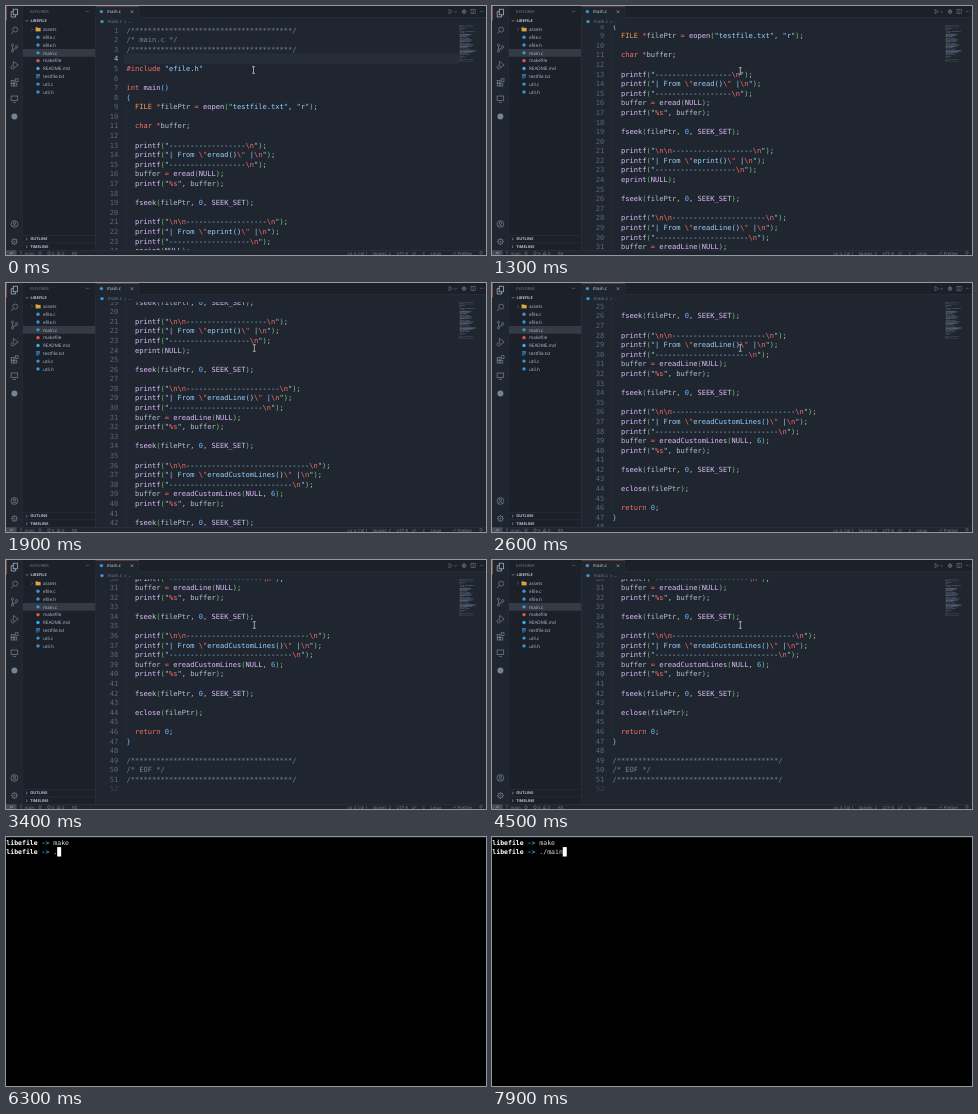
Animation of 480 by 249 pixels, one loop 8 s. Source, as an HTML page with a canvas:

```html
<!DOCTYPE html>
<html lang="en">
<head>
<meta charset="utf-8">
<title>Editor and terminal</title>
<style>
  html, body { margin: 0; width: 100%; height: 100%; overflow: hidden; background: #20262f; }
  canvas { display: block; width: 480px; height: 249px; }
</style>
</head>
<body>
<canvas id="stage"></canvas>
<script>
const W = 480, H = 249, LOOP = 8000;
const canvas = document.getElementById('stage');
const dpr = window.devicePixelRatio || 1;
canvas.width = W * dpr;
canvas.height = H * dpr;
const ctx = canvas.getContext('2d');
ctx.scale(dpr, dpr);
ctx.textRendering = 'geometricPrecision';

const MONO = '"DejaVu Sans Mono", monospace';
const UI = '"Open Sans", "Noto Sans", sans-serif';
const C = {
  bg: '#20262f', side: '#1b2029', line: '#343b45', text: '#b4c1d0', dim: '#768390',
  num: '#5c6672', red: '#f47067', str: '#96d0ff', fn: '#dcbdfb', con: '#6cb6ff',
  type: '#f69d50', brace: ['#6cb6ff', '#6bc46d', '#daaa3f'], accent: '#d0695a'
};

// ---- Document ----
const CELL = 4.25, LINE = 9.59, TICK = 17.76, CODE_X = 120.6, CODE_Y = 24;

const stars = '/' + '*'.repeat(38) + '/';
const seek = ['', '  fseek(filePtr, 0, SEEK_SET);', ''];
const banner = (name, lead) => {
  const title = `| From \\"${name}()\\" |`;
  const dashes = '-'.repeat(title.length - 2);
  return [`${lead}${dashes}`, title, dashes].map(s => `  printf("${s}\\n");`);
};
const show = '  printf("%s", buffer);';
const doc = [
  stars, '/* main.c */', stars, '', '#include "efile.h"', '', 'int main()', '{',
  '  FILE *filePtr = eopen("testfile.txt", "r");', '', '  char *buffer;', '',
  ...banner('eread', ''), '  buffer = eread(NULL);', show, ...seek,
  ...banner('eprint', '\\n\\n'), '  eprint(NULL);', ...seek,
  ...banner('ereadLine', '\\n\\n'), '  buffer = ereadLine(NULL);', show, ...seek,
  ...banner('ereadCustomLines', '\\n\\n'), '  buffer = ereadCustomLines(NULL, 6);', show, ...seek,
  '  eclose(filePtr);', '', '  return 0;', '}', '', stars, '/* EOF */', stars, ''
];

let depth = 0;
function tokenize(src) {
  const out = [];
  const add = (s, col, color) => out.push({ s, col, color });
  const rule = /\/\*.*\/|"(?:\\.|[^"\\])*"|#?\w+|[^\s\w]/g;
  for (const m of src.matchAll(rule)) {
    const s = m[0], col = m.index, next = src[col + s.length];
    if (s.startsWith('/')) add(s, col, C.dim);
    else if (s[0] === '"') {
      for (const p of s.matchAll(/\\.|%s|(?:(?!\\|%s).)+/g))
        add(p[0], col + p.index, /^(\\|%s)/.test(p[0]) ? C.red : C.str);
    }
    else if (/^(#include|int|char|return|\*|=)$/.test(s)) add(s, col, C.red);
    else if (s === 'FILE') add(s, col, C.type);
    else if (/^\d+$/.test(s)) add(s, col, C.con);
    else if (/[({]/.test(s)) add(s, col, C.brace[depth++ % 3]);
    else if (/[)}]/.test(s)) add(s, col, C.brace[--depth % 3]);
    else add(s, col, next === '(' || /^(NULL|SEEK_SET)$/.test(s) ? C.fn : C.text);
  }
  return out;
}
const lines = doc.map(tokenize);

// ---- Drawing helpers ----
function rect(x, y, w, h, color) {
  ctx.fillStyle = color;
  ctx.fillRect(x, y, w, h);
}
function dot(x, y, r, color) {
  ctx.fillStyle = color;
  ctx.beginPath();
  ctx.arc(x, y, r, 0, 7);
  ctx.fill();
}
function ring(x, y, r, color, w = 0.7) {
  ctx.strokeStyle = color;
  ctx.lineWidth = w;
  ctx.beginPath();
  ctx.arc(x, y, r, 0, 7);
  ctx.stroke();
}
function path(points, color, w = 0.7) {
  ctx.strokeStyle = color;
  ctx.lineWidth = w;
  ctx.beginPath();
  for (let i = 0; i < points.length; i += 2) ctx.lineTo(points[i], points[i + 1]);
  ctx.stroke();
}
function box(x, y, w, h, color, lw = 0.7) {
  ctx.strokeStyle = color;
  ctx.lineWidth = lw;
  ctx.strokeRect(x, y, w, h);
}
function label(s, x, y, color, size = 4.62, weight = 400) {
  ctx.font = `${weight} ${size}px ${UI}`;
  ctx.fillStyle = color;
  ctx.fillText(s, x, y + size * 0.36);
}
function cells(s, x, y, step, color) {
  ctx.fillStyle = color;
  for (let i = 0; i < s.length; i++) ctx.fillText(s[i], x + i * step, y);
}
const down = (x, y, c) => path([x - 1.3, y - 0.7, x, y + 0.7, x + 1.3, y - 0.7], c, 0.5);
const right = (x, y, c) => path([x - 0.7, y - 1.3, x + 0.7, y, x - 0.7, y + 1.3], c, 0.5);
function gear(x, y, r, color) {
  ring(x, y, r * 0.7, color);
  ring(x, y, r * 0.22, color, 0.5);
  for (let a = 0; a < 8; a++) {
    const cx = Math.cos(a * Math.PI / 4), cy = Math.sin(a * Math.PI / 4);
    path([x + cx * r * 0.7, y + cy * r * 0.7, x + cx * r, y + cy * r], color, 0.8);
  }
}

// ---- Editor parts ----
function activityBar() {
  rect(0, 0, 17, 244, C.bg);
  rect(16.8, 0, 0.4, 244, C.line);
  rect(0, 0, 0.6, 14.5, C.accent);
  const d = C.dim, x = 8.4;
  box(x - 1.2, 3.2, 4.3, 5.6, C.text);
  path([x - 1.2, 5.6, x - 3.2, 5.6, x - 3.2, 11, x + 1.2, 11, x + 1.2, 8.8], C.text);
  ring(x + 0.8, 23.6, 2.5, d);
  path([x - 1, 25.4, x - 3.4, 28], d);
  ring(x - 1.9, 39.2, 1.1, d);
  ring(x - 1.9, 45, 1.1, d);
  ring(x + 2.2, 40.7, 1.1, d);
  path([x - 1.9, 40.3, x - 1.9, 43.9], d);
  path([x + 2.2, 41.8, x + 1.4, 43, x - 1.9, 43.2], d);
  path([x - 1, 59, x - 1, 55.4, x + 3.8, 59, x, 61.8], d);
  ring(x - 1.7, 61.3, 1.6, d);
  box(x - 3.2, 74.4, 2.8, 2.8, d);
  box(x - 3.2, 77.2, 2.8, 2.8, d);
  box(x - 0.4, 77.2, 2.8, 2.8, d);
  box(x + 0.8, 72.8, 2.8, 2.8, d);
  box(x - 3.3, 90, 6.6, 4.6, d);
  path([x - 1.6, 96.4, x + 1.6, 96.4], d);
  dot(x, 110.5, 3, d);
  ring(x, 218, 3.4, d);
  ring(x, 217, 1.2, d);
  path([x - 2.2, 220.5, x - 1, 219.2, x + 1, 219.2, x + 2.2, 220.5], d);
  gear(x, 235.6, 3.5, d);
}

const blue = '#3c95d0';
const files = [
  ['assets', '#d9a441'], ['efile.c', blue], ['efile.h', blue], ['main.c', blue],
  ['makefile', '#e0584f'], ['README.md', '#42a5f5'], ['testfile.txt', '#42a5f5'],
  ['util.c', blue], ['util.h', blue]
];
function sidebar() {
  rect(17, 0, 72.5, 244, C.side);
  rect(89.2, 0, 0.4, 244, C.line);
  label('EXPLORER', 24, 5.6, C.dim, 3.9);
  label('···', 79.5, 5.4, C.dim, 5, 700);
  down(21, 14.7, C.text);
  label('LIBEFILE', 24.6, 14.7, C.text, 3.9, 700);
  files.forEach(([name, color], i) => {
    const y = 23.4 + i * 7.815;
    if (name === 'main.c') rect(17, y - 3.9, 72.2, 7.8, '#343b45');
    if (i === 0) {
      right(26, y, C.dim);
      rect(29.6, y - 2, 2.2, 1, color);
      rect(29.6, y - 1.5, 5, 3.5, color);
    } else if (name === 'testfile.txt') {
      for (let k = 0; k < 4; k++) rect(30, y - 1.9 + k * 1.1, k < 3 ? 4 : 2.6, 0.6, color);
    } else dot(32, y, 1.7, color);
    label(name, 37, y, C.text);
  });
  [['OUTLINE', 233], ['TIMELINE', 240.7]].forEach(([s, y]) => {
    rect(17, y - 4, 72.2, 0.4, C.line);
    right(20.6, y, C.text);
    label(s, 24.2, y, C.text, 3.9, 700);
  });
}

function tabs() {
  rect(89.6, 0, 390.4, 11.6, C.side);
  rect(89.6, 11.3, 390.4, 0.4, C.line);
  rect(89.6, 0, 43.4, 12, C.bg);
  rect(89.6, 0, 43.4, 0.3, C.accent);
  rect(132.8, 0, 0.3, 11.5, C.line);
  dot(95.4, 5.6, 1.7, blue);
  label('main.c', 100.8, 5.6, '#cdd9e5');
  path([124.7, 4.4, 127.3, 7], C.text, 0.5);
  path([127.3, 4.4, 124.7, 7], C.text, 0.5);
  const d = C.dim;
  path([443, 3.4, 443, 7.8, 446.4, 5.6, 443, 3.4], d, 0.5);
  down(449.5, 5.8, d);
  gear(458, 5.6, 2.2, d);
  box(465, 3.5, 4.2, 4.2, d, 0.5);
  path([467.1, 3.5, 467.1, 7.7], d, 0.5);
  label('···', 473.6, 5.4, d, 5, 700);
  dot(96, 15.6, 1.7, blue);
  label('main.c', 101.6, 15.6, d);
  right(119.2, 15.9, d);
  label('...', 121.8, 15.3, d);
}

function statusBar() {
  rect(0, 244, W, 5, C.bg);
  rect(0, 244, W, 0.4, C.line);
  rect(0, 244.3, 10.5, 4.7, '#444c56');
  path([4, 246, 5.2, 247.2, 4, 248.4], C.text, 0.5);
  path([7, 245.6, 5.8, 246.8, 7, 248], C.text, 0.5);
  const put = (s, x) => label(s, x, 247.2, C.dim, 4.26);
  ring(15, 246, 0.6, C.dim, 0.4);
  path([15, 246.6, 15, 249], C.dim, 0.4);
  put('main', 18.5);
  ring(34, 247.2, 1.3, C.dim, 0.5);
  ring(43, 247.2, 1.4, C.dim, 0.5);
  put('0', 46);
  path([51, 248.5, 52.6, 245.7, 54.2, 248.5, 51, 248.5], C.dim, 0.5);
  put('0', 56);
  put('R0', 66);
  put('Ln 4, Col 1', 341.5);
  put('Spaces: 2', 366.5);
  put('UTF-8', 390.5);
  put('LF', 406);
  put('C', 416.5);
  put('Linux', 424.5);
  path([447, 247.2, 448, 248.3, 450, 245.8], C.dim, 0.5);
  put('Prettier', 451.5);
  ring(475, 246.8, 1.3, C.dim, 0.5);
}

function minimap() {
  ctx.globalAlpha = 0.5;
  lines.forEach((tokens, i) => {
    for (const t of tokens) rect(453 + t.col * 0.355, 19.4 + i * 0.71, t.s.length * 0.355, 0.42, t.color);
  });
  ctx.globalAlpha = 1;
}

function code(scroll) {
  ctx.save();
  ctx.beginPath();
  ctx.rect(89.6, 19.3, 390.4, 224.7);
  ctx.clip();
  const y4 = CODE_Y + 3 * LINE - scroll;
  rect(118.5, y4 - LINE / 2, 334, LINE, '#262d37');
  box(118.5, y4 - LINE / 2, 334, LINE, '#2d343f', 0.4);
  rect(CODE_X, CODE_Y + 7.5 * LINE - scroll, 0.35, 38 * LINE, C.line);
  ctx.font = `7.08px ${MONO}`;
  lines.forEach((tokens, i) => {
    const y = CODE_Y + i * LINE - scroll;
    if (y < 12 || y > 252) return;
    const num = String(i + 1), last = i === lines.length - 1;
    cells(num, 112.3 - num.length * CELL, y + 2.55, CELL, i === 3 ? C.text : last ? '#3d444d' : C.num);
    for (const t of tokens) cells(t.s, CODE_X + t.col * CELL, y + 2.55, CELL, t.color);
  });
  ctx.restore();
}

function pointer(x, y) {
  for (const [color, w] of [['#15181d', 1.5], ['#dfe5ec', 0.7]]) {
    path([x, y - 3, x, y + 3], color, w);
    path([x - 1.5, y - 3.3, x + 1.5, y - 3.3], color, w);
    path([x - 1.5, y + 3.3, x + 1.5, y + 3.3], color, w);
  }
}

// One wheel notch per entry, in ms
const wheel = [500, 700, 950, 1200, 1400, 1500, 1600, 1700, 1800, 1900,
  2200, 2400, 2600, 2800, 3100, 3400];

function editor(t) {
  const scroll = wheel.filter(w => t >= w).length * TICK;
  rect(0, 0, W, H, C.bg);
  code(scroll);
  minimap();
  activityBar();
  sidebar();
  tabs();
  statusBar();
  pointer(scroll ? 248.3 : 247.5, scroll ? 65 : 64);
}

// ---- Terminal ----
const TERM = 3.92;
const typed = (s, times, t) => s.slice(0, times.filter(k => t >= k).length);

function prompt(row, input, cursor) {
  const y = 5.4 + row * 9.4, base = y + 2.3;
  ctx.font = `700 6.5px ${MONO}`;
  cells('libefile', 0.3, base, TERM, '#ffffff');
  cells('->', 0.3 + 9 * TERM, base, TERM, '#35a5d6');
  ctx.font = `6.5px ${MONO}`;
  cells(input, 0.3 + 12 * TERM, base, TERM, '#d8d8d8');
  if (cursor) rect(0.2 + (12 + input.length) * TERM, y - 4.7, 4, 9.4, '#ffffff');
}

function terminal(t) {
  rect(0, 0, W, H, '#000000');
  rect(0, 0, W, 0.6, '#2a2e33');
  const entered = t >= 5400;
  prompt(0, typed('make', [4800, 4900, 5000, 5200], t), !entered);
  if (entered) prompt(1, typed('./main', [5700, 6600, 6800, 7100, 7300, 7600], t), true);
}

function frame(now) {
  const t = now % LOOP;
  if (t < 4800) editor(t);
  else terminal(t);
  requestAnimationFrame(frame);
}
requestAnimationFrame(frame);
</script>
</body>
</html>
```
